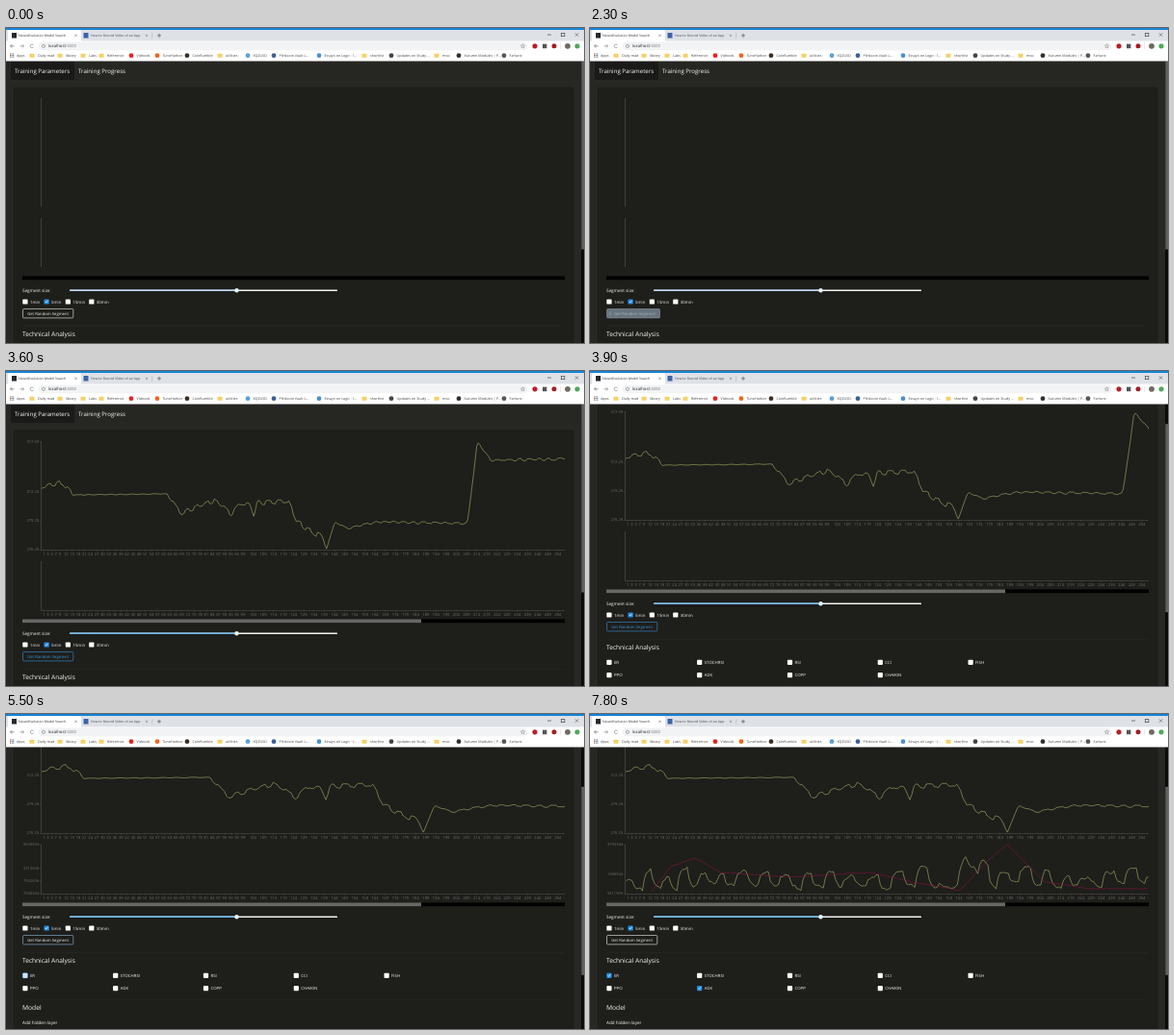
Recreate the animation shown at these times as an HTML page with a canvas. Size 600x328 px, loop 8 s.

```html
<!DOCTYPE html>
<html lang="en">
<head>
<meta charset="utf-8">
<title>NeuroEvolution Model Search</title>
<style>
html, body { margin: 0; width: 100%; height: 100%; overflow: hidden; background: #1e1e1c; }
canvas { display: block; width: 600px; height: 328px; }
</style>
</head>
<body>
<canvas id="stage"></canvas>
<script>
const W = 600, H = 328, LOOP = 8000;
const canvas = document.getElementById('stage');
const ctx = canvas.getContext('2d');
const dpr = window.devicePixelRatio || 1;
canvas.width = W * dpr;
canvas.height = H * dpr;

const FONT = '"Open Sans", "Noto Sans", sans-serif';
const BLUE = '#2390e6', LINE = '#a9b465', AXIS = '#555552', TICK = '#6e6e6b', WHITE = '#f7f7f5';
const LEFT = 36.5, RIGHT = 580, STEP = 2.11;

// ---------- timing ----------
const clamp = v => Math.max(0, Math.min(1, v));
const span = (t, start, length) => clamp((t - start) / length);
const mix = (a, b, p) => a + (b - a) * p;
const smooth = p => p * p * (3 - 2 * p);

// CSS "ease": cubic-bezier(.25, .1, .25, 1)
function ease(x) {
  if (x <= 0 || x >= 1) return clamp(x);
  let lo = 0, hi = 1;
  for (let i = 0; i < 20; i++) {
    const u = (lo + hi) / 2, v = 1 - u;
    if (0.75 * v * v * u + 0.75 * v * u * u + u * u * u < x) lo = u; else hi = u;
  }
  const u = lo, v = 1 - u;
  return 0.3 * v * v * u + 3 * v * u * u + u * u * u;
}

function blend(a, b, p) {
  return `rgb(${a.map((v, i) => Math.round(mix(v, b[i], p)))})`;
}

// ---------- drawing helpers ----------
function rect(x, y, w, h, color) {
  ctx.fillStyle = color;
  ctx.fillRect(x, y, w, h);
}

function round(x, y, w, h, r, fill, stroke, width = 0.6) {
  ctx.beginPath();
  ctx.roundRect(x, y, w, h, r);
  if (fill) { ctx.fillStyle = fill; ctx.fill(); }
  if (stroke) { ctx.strokeStyle = stroke; ctx.lineWidth = width; ctx.stroke(); }
}

function dot(x, y, r, color) {
  ctx.beginPath();
  ctx.arc(x, y, r, 0, 7);
  ctx.fillStyle = color;
  ctx.fill();
}

function path(points, color, width = 0.6) {
  ctx.beginPath();
  points.forEach(([x, y]) => ctx.lineTo(x, y));
  ctx.strokeStyle = color;
  ctx.lineWidth = width;
  ctx.stroke();
}

function text(str, x, y, size, color, align = 'left', weight = 500) {
  ctx.font = `${weight} ${size}px ${FONT}`;
  ctx.textRendering = 'geometricPrecision';
  ctx.fillStyle = color;
  ctx.textAlign = align;
  ctx.textBaseline = 'alphabetic';
  ctx.fillText(str, x, y + size * 0.36);
}

// ---------- data ----------
function random(seed) {
  return () => (seed = (seed * 16807) % 2147483647) / 2147483647;
}

function lookup(keys, x) {
  let i = 1;
  while (i < keys.length - 1 && keys[i][0] < x) i++;
  const [x0, y0] = keys[i - 1], [x1, y1] = keys[i];
  return mix(y0, y1, clamp((x - x0) / (x1 - x0)));
}

// a value that keeps jumping to new random levels and holding them briefly
function jumpy(seed, speed, hold) {
  const rand = random(seed);
  let level = 0.3, value = 0.3, left = 0;
  return () => {
    if (left-- <= 0) {
      level = level > 0.4 ? rand() * 0.3 : 0.5 + rand() * 0.5;
      left = hold + Math.floor(rand() * hold);
    }
    value += (level - value) * speed + (rand() - 0.5) * 0.16;
    return clamp(value);
  };
}

const series = (from, to, f) => {
  const points = [];
  for (let x = from; x <= to; x += STEP) points.push([x, f(x)]);
  return points;
};

const priceTrend = [
  [37, 122], [57, 117], [66, 117], [82, 129], [212, 128], [230, 147], [250, 143], [277, 134],
  [300, 149], [315, 137], [328, 140], [333, 151], [337, 137], [381, 137], [392, 157], [428, 173],
  [433, 186], [445, 157], [462, 164], [505, 157], [629, 159], [643, 74], [662, 93], [776, 91]
];
const priceStep = jumpy(5, 0.8, 2);
const price = series(36.7, 780, x => {
  const rough = x < 82 || (x > 212 && x < 425) ? 6 : x > 445 ? 3 : 0.8;
  const near = clamp(Math.abs(x - 433) / 8);
  return Math.min(186, lookup(priceTrend, x) + (priceStep() - 0.45) * rough * near);
});

const hump = (x, center, width) => Math.exp(-(((x - center) / width) ** 2));
const erStep = jumpy(23, 0.6, 3);
const er = series(37.5, RIGHT, x =>
  Math.min(40, 2 + erStep() * (26 - 22 * hump(x, 370, 12)) + 22 * hump(x, 396, 13)));

const adxTrend = [
  [64, 1], [84, 27], [109, 36], [135, 21], [210, 16], [290, 21], [335, 11],
  [384, 2], [414, 34], [433, 50], [472, 11], [520, 4], [580, 4]
];
const adxRand = random(7);
const adx = series(64, RIGHT, x => lookup(adxTrend, x) + adxRand() * 0.9);

const ticks = [];
for (let n = 1; n < 256; n += n < 9 ? 2 : n < 99 ? 3 : 5) ticks.push(n);

// ---------- browser chrome ----------
const FOLDER = '#f3d069';
const bookmarks = [
  [27, FOLDER, 'Daily read'], [56, FOLDER, 'library'], [80, FOLDER, 'Labs'], [99, FOLDER, 'Reference'],
  [129, '#e8211d', 'Vidnook'], [156, '#f2651f', 'TuneHarbor'], [187, '#3c3027', 'CoinRumble'],
  [222, FOLDER, 'utilities'], [250, '#5c9fd6', 'XQZUSD'], [277, '#3d5f98', 'Plinkcoin Vault L...'],
  [324, '#4a90d0', 'Essays on Logic - l...'], [372, FOLDER, 'shortlist'], [399, '#444', 'Updates on Study ...'],
  [447, FOLDER, 'misc'], [469, '#30302c', 'Autumn Modules | P...'], [516, '#555', 'Farlune']
];

function cross(x, y, r, color) {
  path([[x - r, y - r], [x + r, y + r]], color, 0.5);
  path([[x - r, y + r], [x + r, y - r]], color, 0.5);
}

function arrow(x, y, dir, color) {
  path([[x - 2, y], [x + 2, y]], color);
  path([[x + dir * 0.2, y - 1.8], [x + dir * 2, y], [x + dir * 0.2, y + 1.8]], color);
}

function drawBrowser() {
  rect(0, 0, W, 34.5, '#fff');
  rect(0, 0, W, 13.5, '#dee1e6');
  rect(0, 0, W, 2, '#1683d8');
  round(2, 2, 76, 13, 2, '#fff');
  rect(6, 5, 5, 5.5, '#25282c');
  text('NeuroEvolution Model Search', 13, 7.8, 3.55, '#303236');
  cross(72.5, 7.8, 1.1, '#555');
  rect(80.5, 5, 5, 5.5, '#3d63a8');
  text('How to Record Video of an App', 88, 7.8, 3.55, '#4a4d52');
  rect(142, 4, 6, 8, '#dee1e6');
  cross(146, 7.8, 1.1, '#666');
  rect(151.7, 5, 0.4, 6, '#9da0a5');
  path([[157, 7.8], [161, 7.8]], '#444');
  path([[159, 5.8], [159, 9.8]], '#444');
  path([[562, 7], [566, 7]], '#333');
  ctx.strokeRect(576.5, 5.3, 3.4, 3.4);
  cross(592.5, 7, 1.7, '#333');

  arrow(6.5, 18.8, -1, '#555');
  arrow(16.5, 18.8, 1, '#777');
  ctx.beginPath();
  ctx.arc(27, 18.8, 1.8, 0.4, 5.7);
  ctx.stroke();
  round(33.5, 14.6, 508, 8.6, 4.3, '#f1f3f4');
  ctx.beginPath();
  ctx.arc(39, 18.8, 1.6, 0, 7);
  ctx.stroke();
  text('localhost', 44, 18.8, 4.3, '#222');
  text(':5000', 44 + ctx.measureText('localhost').width, 18.8, 4.3, '#777');
  ctx.beginPath();
  for (let i = 0; i < 10; i++) {
    const r = i % 2 ? 1 : 2.3, a = i * Math.PI / 5 - Math.PI / 2;
    ctx.lineTo(536.5 + r * Math.cos(a), 18.9 + r * Math.sin(a));
  }
  ctx.closePath();
  ctx.strokeStyle = '#666';
  ctx.lineWidth = 0.4;
  ctx.stroke();
  dot(549, 18.8, 2.6, '#b5202b');
  rect(557, 16.6, 4.4, 4.6, '#555');
  dot(569, 18.8, 2.5, '#a51d25');
  rect(575.5, 15.5, 0.4, 6.5, '#ccc');
  dot(583, 18.8, 2.9, '#6d6a60');
  dot(593, 18.8, 2.6, '#4fa95c');

  for (let i = 0; i < 9; i++) {
    rect(4 + (i % 3) * 1.6, 26.4 + Math.floor(i / 3) * 1.6, 1.1, 1.1, ['#d9534a', '#4e9a5a', '#4b7fd0'][i % 3]);
  }
  text('Apps', 11, 28.6, 3.7, '#444');
  for (const [x, color, label] of bookmarks) {
    if (color === FOLDER) round(x - 2.5, 26.7, 5, 4, 0.5, color);
    else dot(x + 1, 28.7, 2.4, color);
    text(label, x + (color === FOLDER ? 6 : 6.5), 28.6, 3.7, '#444');
  }
}

// ---------- page ----------
function checkbox(x, y, label, state = 'off') {
  const fill = { off: '#fff', press: '#cfe4fa', on: BLUE }[state];
  round(x, y - 2.6, 5.2, 5.2, 0.9, fill, state === 'press' ? '#6fb4ee' : null, 0.4);
  if (state === 'on') path([[x + 1.3, y], [x + 2.2, y + 1], [x + 3.9, y - 1.2]], '#fff', 0.7);
  text(label, x + 7.6, y, 4.35, WHITE);
}

function drawButton(t) {
  const y = 292.5, h = 9.4;
  if (t >= 2200 && t < 3500) {
    round(17.5, y, 55, h, 1, '#67737d', '#8b98a2');
    const a = (t - 2200) / 750 * 2 * Math.PI;
    ctx.beginPath();
    ctx.arc(21.6, 297.3, 1.4, a, a + 4.7);
    ctx.strokeStyle = '#aab4bb';
    ctx.lineWidth = 0.5;
    ctx.stroke();
    text('Get Random Segment', 25.2, 297.2, 4.2, '#a9b3ba');
    return;
  }
  const hover = span(t, 950, 150) * (1 - span(t, 4900, 200));
  const focus = t > 4900 && t < 5550 ? 0.55 : 0;
  const white = [238, 238, 235], blue = [60, 146, 212];
  round(17.5, y, 52.3, h, 1, t >= 2080 && t < 2200 ? '#23465f' : null,
    blend(white, blue, Math.max(hover, focus)));
  text('Get Random Segment', 22.2, 297.2, 4.2, blend(white, blue, hover));
}

function drawSeries(heights, color, scale, p) {
  if (p <= 0) return;
  const pts = heights.map(([x, h]) => [x, 248.3 - h * scale]);
  let length = 0;
  for (let i = 1; i < pts.length; i++) {
    length += Math.hypot(pts[i][0] - pts[i - 1][0], pts[i][1] - pts[i - 1][1]);
  }
  if (p < 1) ctx.setLineDash([length * p, length]);
  path(pts, color, 0.6);
  ctx.setLineDash([]);
}

function drawScale(bottom, gap, labels) {
  labels.forEach((label, i) => {
    const y = bottom - i * gap;
    rect(34.5, y, 1.6, 0.4, AXIS);
    text(label, 34, y, 4, TICK, 'right', 400);
  });
}

function drawCharts(t) {
  rect(36, 73, 0.6, 113, AXIS);
  rect(36, 198, 0.6, 51, AXIS);
  rect(17, 258.4, 563, 3.8, '#000');
  if (t < 3500) return;

  rect(17, 258.4, 414, 3.8, '#676765');
  for (const y of [186, 249]) {
    rect(36, y, RIGHT - 36, 0.5, AXIS);
    for (const n of ticks) {
      const x = 37 + n * STEP;
      rect(x, y, 0.4, 1.6, AXIS);
      text(String(n), x, y + 4.3, 4.05, TICK, 'center', 400);
    }
  }
  drawScale(186, 30, ['276.29', '279.29', '312.29']);
  drawScale(73.5, 0, ['317.09']);

  const zoom = mix(0.735, 1, ease(span(t, 3525, 1250)));
  ctx.save();
  ctx.beginPath();
  ctx.rect(LEFT, 60, RIGHT - LEFT, 140);
  ctx.clip();
  path(price.map(([x, y]) => [LEFT + (x - LEFT) * zoom, y]), LINE);
  ctx.restore();

  if (t < 5420) return;
  if (t < 6700) {
    drawScale(248.5, 13, ['7000344', '7552656', '2213656']);
    drawScale(198, 0, ['9600534']);
  } else {
    drawScale(248.5, 20, ['9211906', '1688544']);
    drawScale(198, 0, ['4794344']);
  }
  const added = ease(span(t, 6720, 1000));
  drawSeries(er, LINE, mix(1.25, 1, added), ease(span(t, 5510, 900)));
  drawSeries(adx, '#861540', 1, added);
}

function drawPage(t, scroll) {
  rect(0, 34, W, H, '#272724');
  ctx.save();
  ctx.translate(0, -scroll);
  rect(0, 34, 597, 20, '#262623');
  rect(5, 35, 66, 19, '#1a1a18');
  text('Training Parameters', 9, 44.5, 6.1, WHITE);
  text('Training Progress', 75, 44.5, 6.1, WHITE);
  round(8.5, 62, 580.5, 420, 1, '#1e1e1b', '#181816', 0.6);

  drawCharts(t);

  text('Segment size:', 17, 273.3, 4.6, WHITE);
  round(66, 272.6, 278, 1.5, 0.7, '#f2f2f0');
  round(66, 272.6, 173, 1.5, 0.7, t < 3500 ? '#b4d1ee' : '#6bb8ea');
  dot(239.5, 273.3, 2.2, '#e9f4fd');

  checkbox(17.3, 285, '1min');
  checkbox(39.5, 285, '5min', 'on');
  checkbox(61.8, 285, '15min');
  checkbox(86.2, 285, '30min');
  drawButton(t);

  rect(17, 310.5, 563, 0.4, '#2b2b28');
  text('Technical Analysis', 17, 319, 6.6, WHITE);
  const names = ['ER', 'STOCHRSI', 'RSI', 'CCI', 'FISH', 'PPO', 'ADX', 'COPP', 'CHAIKIN'];
  const clicks = { ER: 5400, ADX: 6650 };
  names.forEach((name, i) => {
    const since = t - (clicks[name] ?? Infinity);
    const state = since < 0 ? 'off' : since < 150 ? 'press' : 'on';
    checkbox(17.3 + (i % 5) * 93.8, i < 5 ? 334.3 : 347.6, name, state);
  });
  rect(17, 359, 563, 0.4, '#2b2b28');
  text('Model', 17, 367.3, 6.7, WHITE);
  text('Add hidden layer', 17, 383.3, 4.6, WHITE);
  ctx.restore();

  rect(597, 34, 3, H, '#0b0b0a');
  rect(597.3, 34.5 + scroll * 2 / 3, 2.7, 196, '#626260');
}

function draw(t) {
  ctx.setTransform(dpr, 0, 0, dpr, 0, 0);
  const scroll = 31 * smooth(span(t, 3650, 200)) + 31 * smooth(span(t, 4000, 200));
  drawPage(t, scroll);
  drawBrowser();
}

const start = performance.now();
function tick(now) {
  draw(Math.max(0, now - start) % LOOP);
  requestAnimationFrame(tick);
}
draw(0);
requestAnimationFrame(tick);
</script>
</body>
</html>
```
